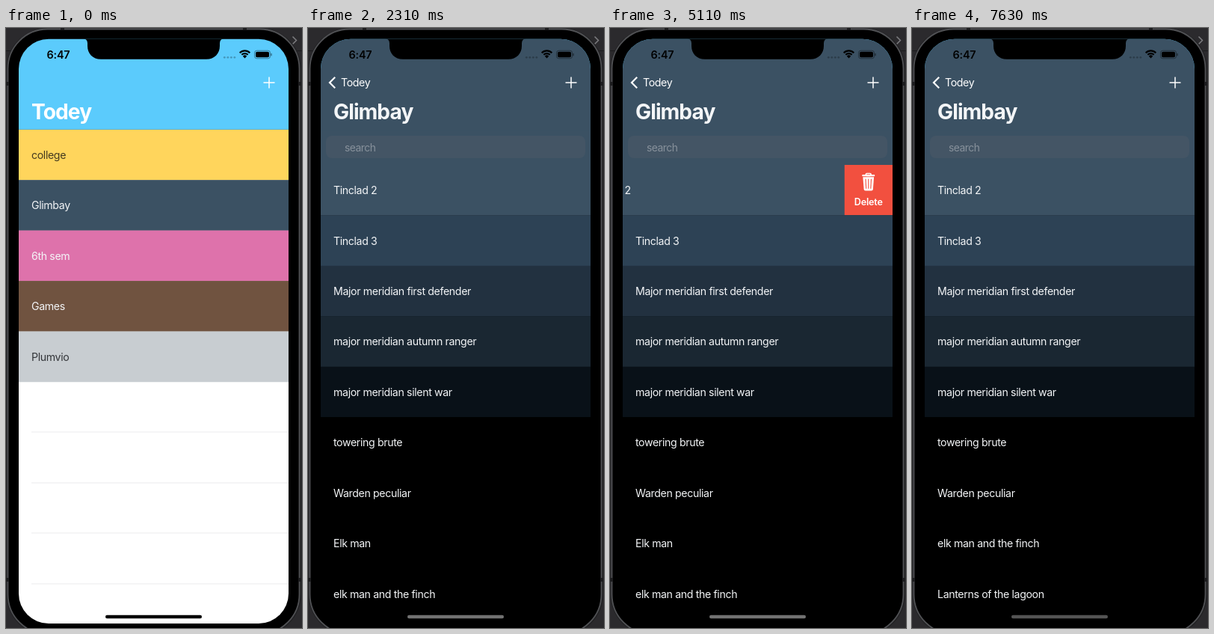
Animation of 396x802 px, one loop 7.77 s. Source, as an HTML page with a canvas:

```html
<!DOCTYPE html>
<html lang="en">
<head>
<meta charset="utf-8">
<title>Todey</title>
<style>
html, body { margin: 0; width: 100%; height: 100%; overflow: hidden; background: #2b2a2d; }
canvas { display: block; width: 396px; height: 802px; }
</style>
</head>
<body>
<canvas id="stage"></canvas>
<script>
const W = 396, H = 802, LOOP = 7770, STEP = 70;
const SCREEN = { x: 17, y: 14.7, w: 361, h: 781.3 };
const RIGHT = SCREEN.x + SCREEN.w;
const ROW = 67.45, BAR_END = 135.7, LIST_TOP = 182.9, ACTION_W = 64.5;
const RED = '#f2503f', NAVY = '#3b5163', SKY = '#5bcbfc', PALE = '#f3f5f7';

const categories = [
  ['college', '#ffd55c', '#443a20'],
  ['Glimbay', NAVY, PALE],
  ['6th sem', '#de72ab', PALE],
  ['Games', '#705340', PALE],
  ['Plumvio', '#c8cdd1', '#34363a']
];
const shades = [NAVY, '#2d4255', '#223140', '#1a2732', '#091118'];
const items = [
  'Tinclad 2', 'Tinclad 3', 'Major meridian first defender',
  'major meridian autumn ranger', 'major meridian silent war',
  'towering brute', 'Warden peculiar', 'Elk man',
  'elk man and the finch', 'Lanterns of the lagoon'
];
const DELETED = 7;

const canvas = document.getElementById('stage');
const ctx = canvas.getContext('2d');
const dpr = window.devicePixelRatio || 1;
canvas.width = W * dpr;
canvas.height = H * dpr;

const clamp = v => Math.min(1, Math.max(0, v));
const span = (t, a, b) => clamp((t - a) / (b - a));
const lerp = (a, b, p) => a + (b - a) * p;
const smooth = p => p * p * (3 - 2 * p);
const easeOut = p => 1 - (1 - p) ** 3;

function rect(x, y, w, h, color) {
  ctx.fillStyle = color;
  ctx.fillRect(x, y, w, h);
}

function round(x, y, w, h, r) {
  ctx.beginPath();
  ctx.roundRect(x, y, w, h, r);
}

function line(points, color, width) {
  ctx.beginPath();
  points.forEach(([x, y], i) => i ? ctx.lineTo(x, y) : ctx.moveTo(x, y));
  ctx.strokeStyle = color;
  ctx.lineWidth = width;
  ctx.stroke();
}

function text(str, x, y, color, size = 14.2, weight = 400, spacing = -0.38, align = 'left') {
  ctx.font = `${weight} ${size}px Inter, sans-serif`;
  ctx.letterSpacing = spacing + 'px';
  ctx.textAlign = align;
  ctx.fillStyle = color;
  ctx.fillText(str, x, y);
}

const heading = (str, x, color) => text(str, x, 122, color, 28.2, 700, -0.95);

function faded(alpha, draw) {
  if (alpha <= 0) return;
  ctx.save();
  ctx.globalAlpha *= alpha;
  draw();
  ctx.restore();
}

function clipped(x, y, w, h, draw) {
  ctx.save();
  ctx.beginPath();
  ctx.rect(x, y, w, h);
  ctx.clip();
  draw();
  ctx.restore();
}

// Critically damped push of the detail screen
function pushAt(t) {
  const k = Math.max(0, t - 1732) * 0.015;
  const p = 1 - (1 + k) * Math.exp(-k);
  return p > 0.997 ? 1 : p;
}

function peekAt(t) {
  const open = easeOut(span(t, 3500, 3990));
  const close = smooth(span(t, 5250, 5810));
  return ACTION_W * (open - close);
}

function wipeAt(t) {
  const drag = 182 * smooth(span(t, 6720, 7140));
  return drag + (SCREEN.w - 182) * smooth(span(t, 7140, 7280));
}

function categoryList(p, t) {
  const dx = -0.3 * SCREEN.w * p;
  const left = SCREEN.x + dx;
  rect(left, BAR_END, SCREEN.w, H, '#fff');
  categories.forEach(([name, color, ink], i) => {
    const y = BAR_END + i * ROW;
    const pressed = i === 1 && t >= 1610;
    rect(left, y, SCREEN.w, ROW + 0.3, pressed ? '#dad9de' : color);
    text(name, 34 + dx, y + 39.2, pressed ? '#eeedf2' : ink);
  });
  for (let i = 6; i < 10; i++) {
    rect(34 + dx, Math.round(BAR_END + i * ROW) - 0.5, SCREEN.w, 1, '#ececee');
  }
  if (p > 0) rect(SCREEN.x, BAR_END, SCREEN.w, H, `rgba(0,0,0,${0.1 * p})`);
}

function trash(cx, y) {
  ctx.fillStyle = '#fff';
  round(cx - 8.5, y + 2.4, 17, 2.2, 1);
  ctx.fill();
  ctx.strokeStyle = '#fff';
  ctx.lineWidth = 1.6;
  round(cx - 3.4, y + 0.8, 6.8, 3, 1.2);
  ctx.stroke();
  ctx.beginPath();
  ctx.moveTo(cx - 7.4, y + 5.6);
  ctx.lineTo(cx + 7.4, y + 5.6);
  ctx.lineTo(cx + 6.1, y + 22);
  ctx.quadraticCurveTo(cx + 5.9, y + 23.8, cx + 4, y + 23.8);
  ctx.lineTo(cx - 4, y + 23.8);
  ctx.quadraticCurveTo(cx - 5.9, y + 23.8, cx - 6.1, y + 22);
  ctx.fill();
  [-3.4, 0, 3.4].forEach(d =>
    line([[cx + d * 1.1, y + 8], [cx + d * 0.9, y + 21]], RED, 1.1));
}

function deleteAction(y, w, h) {
  if (w < 0.5) return;
  const left = RIGHT - w;
  clipped(left, y, w, h, () => {
    rect(left, y, w, h, RED);
    const middle = left + Math.max(w, ACTION_W) / 2;
    const cx = lerp(middle, left + 31.5, smooth(span(w, 120, 180)));
    trash(cx, y + 10.8);
    text('Delete', cx, y + 53.6, '#fff', 12.6, 600, -0.2, 'center');
  });
}

function itemList(dx, t) {
  const left = SCREEN.x + dx;
  const collapse = smooth(span(t, 7280, 7560));
  rect(left, BAR_END, SCREEN.w, H, '#000');
  rect(left, BAR_END, SCREEN.w, LIST_TOP - BAR_END + 1, NAVY);
  items.forEach((name, i) => {
    const y = LIST_TOP + (i - (i > DELETED ? collapse : 0)) * ROW;
    const h = i === DELETED ? ROW * (1 - collapse) : ROW;
    const pull = i === 0 ? peekAt(t) : i === DELETED ? wipeAt(t) : 0;
    if (h < 0.1) return;
    rect(left, y, SCREEN.w, h + 0.3, shades[i] || '#000');
    clipped(left, y, SCREEN.w, h, () => text(name, 34 + dx - pull, y + 39.2, PALE));
    deleteAction(y, pull, h);
  });
}

function searchField(dx) {
  round(24 + dx, 144, 347, 30, 8);
  ctx.fillStyle = '#445565';
  ctx.fill();
  text('search', 49 + dx, 164.7, '#87919b', 13.9, 400, -0.5);
}

function navBar(p) {
  const slide = SCREEN.w * (1 - p);
  rect(SCREEN.x, 0, SCREEN.w, BAR_END, SKY);
  faded(p, () => rect(SCREEN.x, 0, SCREEN.w, BAR_END + 0.5, NAVY));
  faded(1 - p * 1.6, () => heading('Todey', 34 - 40 * p, '#fff'));
  faded(p, () => {
    heading('Glimbay', 34 + slide, PALE);
    line([[36.2, 65.8], [29, 73], [36.2, 80.2]], '#fff', 2.2);
    text('Todey', 44 + slide * 0.2, 78.2, '#fff');
  });
  line([[344.5, 73], [359.5, 73]], '#fff', 1.5);
  line([[352, 65.5], [352, 80.5]], '#fff', 1.5);
}

function statusBar(p) {
  text('6:47', 54.5, 40.8, '#000', 14.4, 600, -0.2);
  if (p === 0 || p === 1) {
    for (let i = 0; i < 4; i++) {
      ctx.beginPath();
      ctx.arc(292.3 + i * 4.5, 39.3, 1.4, 0, 7);
      ctx.fillStyle = 'rgba(0,0,0,.25)';
      ctx.fill();
    }
  }
  [9.6, 5.9].forEach(r => {
    ctx.beginPath();
    ctx.arc(319.5, 40, r, -Math.PI * 0.75, -Math.PI * 0.25);
    ctx.strokeStyle = '#000';
    ctx.lineWidth = 2.1;
    ctx.stroke();
  });
  ctx.beginPath();
  ctx.moveTo(319.5, 40.4);
  ctx.arc(319.5, 40.4, 3.8, -Math.PI * 0.75, -Math.PI * 0.25);
  ctx.fillStyle = '#000';
  ctx.fill();
  round(332.5, 30.2, 21, 10.6, 3);
  ctx.strokeStyle = 'rgba(0,0,0,.4)';
  ctx.lineWidth = 1;
  ctx.stroke();
  round(334, 31.7, 18, 7.6, 1.8);
  ctx.fill();
  round(354.3, 33.8, 1.4, 3.6, 0.7);
  ctx.fillStyle = 'rgba(0,0,0,.45)';
  ctx.fill();
}

function phoneBody() {
  rect(0, 0, W, H, '#2b2a2d');
  rect(0, 30, W, 1, '#1b1b1d');
  line([[383.5, 11.5], [388.5, 16.5], [383.5, 21.5]], '#7c7c7f', 1.5);
  round(0.5, 0, 394.5, 812, 55);
  ctx.fillStyle = '#222224';
  ctx.fill();
  round(2.5, 1.5, 390, 808.5, 53);
  ctx.fillStyle = '#000';
  ctx.fill();
  ctx.strokeStyle = '#505154';
  ctx.lineWidth = 1.8;
  ctx.stroke();
  [73, 317].forEach(x => rect(x, 0, 5, 3, '#1c1c1e'));
  [72, 735].forEach(y => {
    rect(0, y, 4, 5, '#1c1c1e');
    rect(391, y, 4, 5, '#1c1c1e');
  });
}

function notch() {
  ctx.beginPath();
  ctx.moveTo(103.5, 14);
  ctx.quadraticCurveTo(109, 14.7, 109, 20.5);
  ctx.lineTo(109, 24);
  ctx.bezierCurveTo(109, 34, 116, 41.8, 127, 41.8);
  ctx.lineTo(268, 41.8);
  ctx.bezierCurveTo(279, 41.8, 286, 34, 286, 24);
  ctx.lineTo(286, 20.5);
  ctx.quadraticCurveTo(286, 14.7, 291.5, 14);
  ctx.fillStyle = '#000';
  ctx.fill();
}

function draw(t) {
  const p = pushAt(t);
  const dx = SCREEN.w * (1 - p);
  ctx.setTransform(dpr, 0, 0, dpr, 0, 0);
  phoneBody();
  ctx.save();
  round(SCREEN.x, SCREEN.y, SCREEN.w, SCREEN.h, 40);
  ctx.clip();
  if (p < 1) categoryList(p, t);
  if (p > 0) {
    itemList(dx, t);
    searchField(dx);
  }
  navBar(p);
  statusBar(p);
  notch();
  round(133, 784.8, 129, 4.4, 2.2);
  const grey = lerp(114, 84, span(t, 7280, 7560));
  ctx.fillStyle = p < 0.5 ? '#000' : `rgb(${grey},${grey},${grey})`;
  ctx.fill();
  ctx.restore();
}

const start = performance.now();
function frame() {
  const t = (performance.now() - start) % LOOP;
  draw(Math.floor(t / STEP) * STEP);
  requestAnimationFrame(frame);
}
frame();
</script>
</body>
</html>
```
